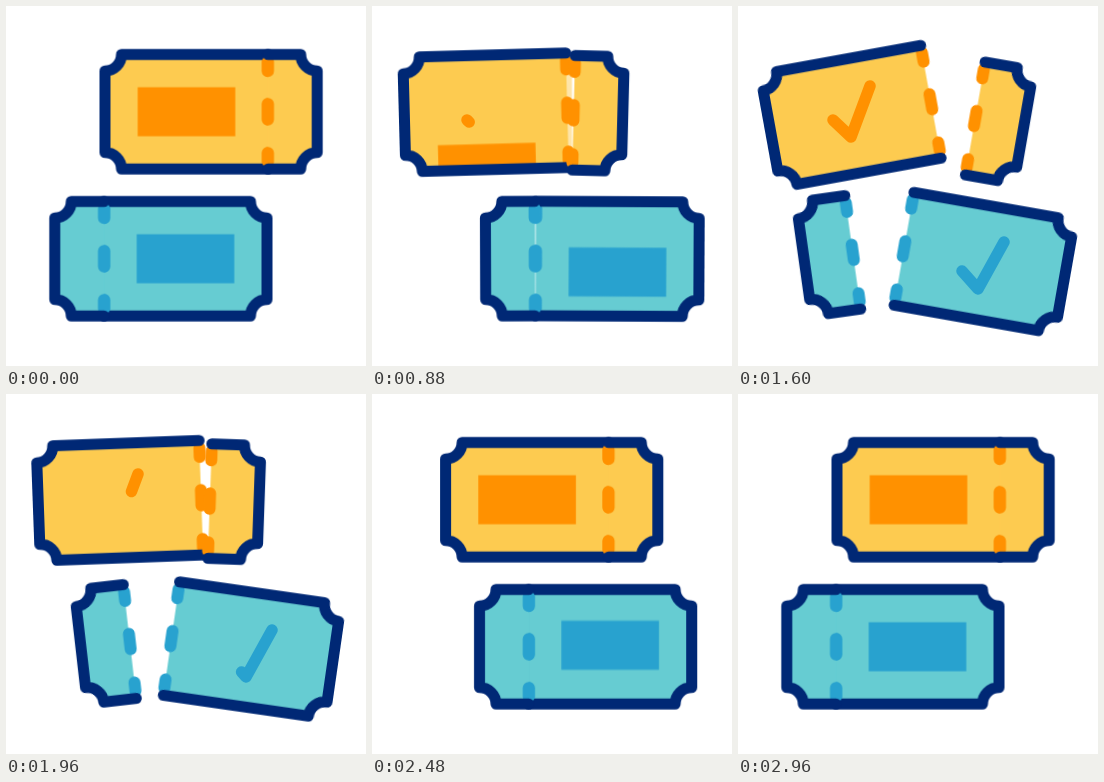
These frames come from a looping animation (360 px wide and 360 px high, 3 s). An HTML page:

```html
<!DOCTYPE html>
<html lang="en">
<head>
<meta charset="utf-8">
<title>Tickets</title>
<style>
  html, body { margin: 0; width: 100%; height: 100%; overflow: hidden; background: #fff; }
  svg { display: block; width: 100vw; height: 100vh; }

  .yellow { --body: #fdcb50; --ink: #ff9100; }
  .blue { --body: #66ccd2; --ink: #28a2cf; }

  .body { fill: var(--body); }
  .edge { fill: none; stroke: #002875; stroke-width: 11; stroke-linecap: round; stroke-linejoin: round; }
  .holes { fill: none; stroke: var(--ink); stroke-width: 12; stroke-linecap: round; }
  .label { fill: var(--ink); }
  .seam { fill: none; stroke: var(--body); stroke-width: 9; }
  .check {
    fill: none; stroke: var(--ink); stroke-width: 11.5; stroke-linecap: round; stroke-linejoin: round;
    stroke-dasharray: 1 3; stroke-dashoffset: 1.1;
  }

  .slide, .part, .label, .seam, .check {
    animation: 3s cubic-bezier(.333, 0, .667, 1) infinite;
  }
  .yellow .slide { animation-name: slide-y; }
  .yellow .part  { animation-name: tear-y; }
  .yellow .label { animation-name: label-y; }
  .yellow .seam  { animation-name: seam-y; }
  .yellow .check { animation-name: check-y; }
  .blue .slide { animation-name: slide-b; }
  .blue .part  { animation-name: tear-b; }
  .blue .label { animation-name: label-b; }
  .blue .seam  { animation-name: seam-b; }
  .blue .check { animation-name: check-b; }

  /* where each half ends up when fully torn */
  .yellow .main { --x: -1.3px; --y: 4.6px; --r: -10.3deg; }
  .yellow .stub { --x: 41.4px; --y: 11px; --r: 9.9deg; }
  .blue .main { --x: -.8px; --y: 4.2px; --r: -10deg; }
  .blue .stub { --x: 49px; --y: -3px; --r: 8deg; }

  @keyframes slide-y {
    0%, 2.67%, 88%, 100% { transform: translateX(0); }
    18.5%, 75.4% { transform: translateX(-66.5px); }
  }
  @keyframes slide-b {
    0%, 7.6%, 95.67%, 100% { transform: translateX(0); }
    23.43%, 79.33% { transform: translateX(66px); }
  }
  @keyframes tear-y {
    0%, 25.8%, 69.6%, 100% { transform: translate(0, 0) rotate(0deg); }
    40.47%, 54.93% { transform: translate(var(--x), var(--y)) rotate(var(--r)); }
  }
  @keyframes tear-b {
    0%, 27.97%, 76.03%, 100% { transform: translate(0, 0) rotate(0deg); }
    42.63%, 61.37% { transform: translate(var(--x), var(--y)) rotate(var(--r)); }
  }
  /* the label drops out below and comes back from above */
  @keyframes label-y {
    0%, 22.37%, 79.33%, 100% { transform: translateY(0); }
    34.37%, 50% { transform: translateY(90px); }
    50.01%, 67.33% { transform: translateY(-90px); }
  }
  @keyframes label-b {
    0%, 26.47%, 83.63%, 100% { transform: translateY(0); }
    38.47%, 50% { transform: translateY(90px); }
    50.01%, 71.63% { transform: translateY(-90px); }
  }
  @keyframes seam-y {
    0%, 26.67%, 69.61%, 100% { opacity: 1; }
    32%, 69.6% { opacity: 0; }
  }
  @keyframes seam-b {
    0%, 26.67%, 76.04%, 100% { opacity: 1; }
    32%, 76.03% { opacity: 0; }
  }
  @keyframes check-y {
    0%, 26% { stroke-dashoffset: 1.1; }
    41.17%, 55.77% { stroke-dashoffset: 0; }
    70.93%, 100% { stroke-dashoffset: -1.1; }
  }
  @keyframes check-b {
    0%, 29.43% { stroke-dashoffset: 1.1; }
    44.6%, 60.97% { stroke-dashoffset: 0; }
    76.13%, 100% { stroke-dashoffset: -1.1; }
  }
</style>
</head>
<body>
<svg viewBox="0 0 360 360">
  <defs>
    <path id="main" d="M81.5-57.25H-65A16.5 16.5 0 0 1-81.5-40.75V40.75A16.5 16.5 0 0 1-65 57.25H81.5"/>
    <path id="stub" d="M-24.6-57.25H8.1A16.5 16.5 0 0 0 24.6-40.75V40.75A16.5 16.5 0 0 0 8.1 57.25H-24.6"/>
    <path id="holes" d="M0-50V-40.75M0-7.75V7.75M0 41.25V50"/>
    <clipPath id="inside"><use href="#main"/></clipPath>
  </defs>

  <g class="yellow">
    <g class="slide">
      <g transform="translate(262 105.75)">
        <path class="seam" d="M0-52V52"/>
        <g transform="translate(-81.5 0)">
          <g class="part main">
            <use class="body" href="#main"/>
            <g clip-path="url(#inside)"><rect class="label" x="-48.8" y="-24.5" width="97.6" height="49"/></g>
            <use class="holes" href="#holes" x="81.5"/>
            <use class="edge" href="#main"/>
          </g>
        </g>
        <g transform="translate(24.6 0)">
          <g class="part stub">
            <use class="body" href="#stub"/>
            <use class="holes" href="#holes" x="-24.6"/>
            <use class="edge" href="#stub"/>
          </g>
        </g>
      </g>
    </g>
    <path class="check" pathLength="1" d="M95 114L113 131L132 80"/>
  </g>

  <g class="blue">
    <g class="slide">
      <g transform="translate(98 252.75) scale(-1 1)">
        <path class="seam" d="M0-52V52"/>
        <g transform="translate(-81.5 0)">
          <g class="part main">
            <use class="body" href="#main"/>
            <g clip-path="url(#inside)"><rect class="label" x="-48.8" y="-24.5" width="97.6" height="49"/></g>
            <use class="holes" href="#holes" x="81.5"/>
            <use class="edge" href="#main"/>
          </g>
        </g>
        <g transform="translate(24.6 0)">
          <g class="part stub">
            <use class="body" href="#stub"/>
            <use class="holes" href="#holes" x="-24.6"/>
            <use class="edge" href="#stub"/>
          </g>
        </g>
      </g>
    </g>
    <path class="check" pathLength="1" d="M224 265L240 283L266 236"/>
  </g>
</svg>
</body>
</html>
```
